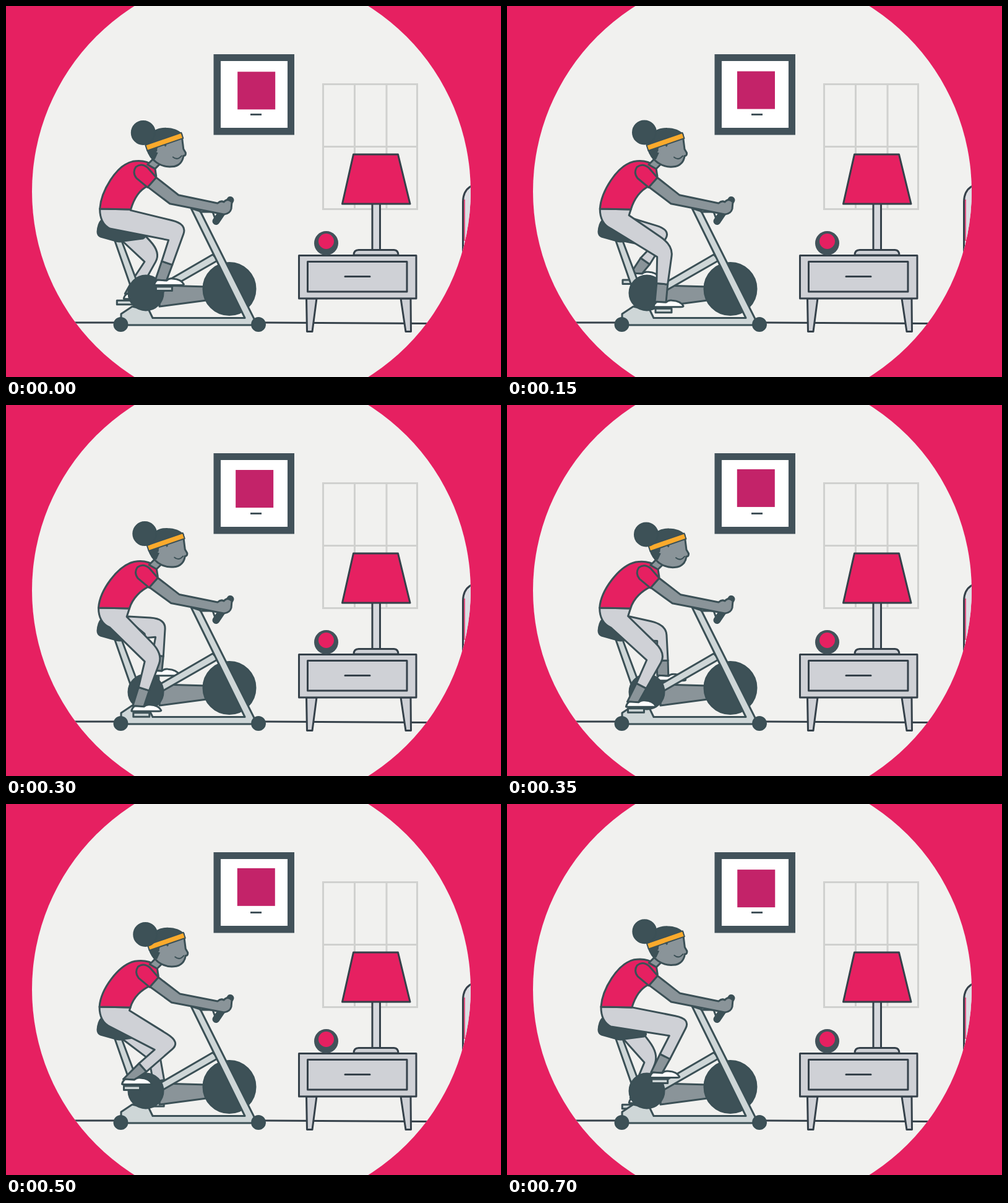
Write an HTML page that moves like this. It is 800 px wide and 600 px high and loops after 750 ms.

```html
<!DOCTYPE html>
<html lang="en">
<head>
<meta charset="utf-8">
<title>Exercise bike</title>
<style>
  html, body { margin: 0; width: 100%; height: 100%; overflow: hidden; background: #e62061; }
  svg { display: block; width: 100vw; height: 100vh; }
  .ink { stroke: #3b5056; stroke-width: 3; stroke-linejoin: round; stroke-linecap: round; }
  .room { stroke: #35414a; stroke-width: 3; stroke-linejoin: round; stroke-linecap: round; }
  .fine { stroke-width: 2; }
  .grip { stroke-width: 12; }
  .dark { fill: #3d5157; }
  .cloth { fill: #cfd1d6; }
  .metal { fill: #ced6d7; }
  .skin { fill: #8a9499; }
  .pink { fill: #e62061; }
  .white { fill: #fff; }
  .none { fill: none; }
</style>
</head>
<body>
<svg viewBox="0 0 800 600">
  <defs><clipPath id="hole"><circle cx="396.5" cy="300" r="354.5"/></clipPath></defs>
  <rect width="800" height="600" class="pink"/>
  <g clip-path="url(#hole)">
    <rect width="800" height="600" fill="#f1f1ef"/>

    <!-- wall -->
    <path d="M512.5 126.5H664.5V328.5H512.5ZM563.5 126.5V328.5M615 126.5V328.5M512.5 227.5H664.5" class="none" stroke="#d0d1cf" stroke-width="3"/>
    <rect x="335.5" y="78" width="130.5" height="130.5" fill="#42525a"/>
    <rect x="347" y="89" width="108" height="108" class="white"/>
    <rect id="badge" x="-30.5" y="-30.5" width="61" height="61" fill="#c32369"/>
    <path d="M395 175.5H413" stroke="#42525a" stroke-width="3"/>

    <!-- furniture -->
    <path d="M105 512H420L690 513.5" class="room none"/>
    <path d="M760 288Q738 294 738.5 318V400H760Z" class="room" fill="#dcdde2"/>
    <path d="M741 313V380" stroke="#e62061" stroke-width="1.5"/>
    <g class="room">
      <path d="M485.500 473H502L495 526.5H486.5ZM638 473H654L654.5 526.5H646Z" class="cloth"/>
      <rect x="592" y="318" width="12.5" height="78" fill="#d6d8dd"/>
      <path d="M562 403Q562 394.5 570 394.5H627Q634 395 634 403Z" class="cloth"/>
      <rect x="473.5" y="403.5" width="189.5" height="69.5" class="cloth"/>
      <rect x="487.5" y="413.5" width="160.5" height="48.5" class="cloth"/>
      <path d="M548 437.5H588"/>
      <path d="M561.5 240H633.5L653 320H543.5Z" class="pink"/>
    </g>
    <circle cx="517.5" cy="383.5" r="19.5" fill="#42525a"/>
    <circle cx="517.5" cy="380.5" r="12.5" class="pink"/>

    <!-- bike and rider -->
    <g class="ink">
      <g id="farLeg"></g>
      <path d="M250 452L324 454V476L248 486Z" class="skin"/>
      <path d="M176 380H187L214 452L201 452Z" class="metal"/>
      <path d="M154 347Q149 352 148 365Q148 371 153 373L178 380Q184 382 190 380L221 376Q226 374 224 370L200 350Z" class="dark"/>
      <circle cx="361" cy="457.5" r="42" class="dark"/>
      <path d="M248 452L334 402L343 411L254 462Z" class="metal"/>
      <path d="M186 516V498L204 486L231 492L237 504.5H386L299 327L314 332L406 516Z" class="metal"/>
      <circle cx="226" cy="464" r="28" class="dark"/>
      <circle cx="185.5" cy="515" r="10.5" class="dark"/>
      <circle cx="408" cy="515" r="10.5" class="dark"/>
      <path d="M314 333H334L338 344" class="none"/>
      <path d="M339.5 348L362.5 314" class="grip"/>
      <g id="nearLeg"></g>
      <path id="torso" class="pink"/>
      <path id="arm" class="skin"/>
      <g id="head">
        <path d="M229 257L240 246L250 255L241 264Z" class="skin"/>
        <path d="M229 232C233 250 250 262 268 260.5C281 260 286 251 287 243Q291 243 290.5 238L287 232L284 208L229 226Z" class="skin"/>
        <path d="M229 219C232 205 246 198.5 259 199C270 199 279 203 283 208L228 226ZM229 234Q233 244 240 247L245 236L258 226L256 223Z" class="dark"/>
        <path d="M243 237C243 224 252 220 257 227L258 232L246 238Z" class="skin" stroke="none"/>
        <path d="M243.5 235C243 225 252 220 257 226M270 245Q277 251 284 243" class="none fine"/>
        <path d="M225.5 225.5L283.500 205.5L286.5 214.5L228.5 234.5Z" fill="#fbaa2c" class="fine"/>
      </g>
      <circle id="bun" cx="222" cy="206" r="18.5" class="dark"/>
      <path id="sleeve" class="pink"/>
    </g>
  </g>
</svg>
<script>
const LOOP = 750, STEP = 50, TURN = 2 * Math.PI;

// each leg: joint lengths, half width, and the circle its pedal follows
const near = { hip: [195, 330], thigh: 90, shin: 83, cuff: 53, half: 14.5,
  crank: [230, 473], radius: 30, phase: -0.56, foot: 0 };
const far = { hip: [178, 365], thigh: 72, shin: 70, cuff: 45, half: 11,
  crank: [219, 468], radius: 29, phase: 2.74, foot: 14 };

const $ = id => document.getElementById(id);
const set = (id, d) => $(id).setAttribute('d', d);
const move = (id, x, y) => $(id).setAttribute('transform', `translate(${x} ${y})`);
const shape = (d, cls) => `<path d="${d}" class="${cls}"/>`;

const add = (p, q, k = 1) => [p[0] + q[0] * k, p[1] + q[1] * k];
const polar = (angle, r = 1) => [r * Math.cos(angle), r * Math.sin(angle)];
const angleTo = (p, q) => Math.atan2(q[1] - p[1], q[0] - p[0]);
const wave = (t, peak) => Math.cos(TURN * (t - peak) / LOOP);

function random(seed) {
  const v = Math.sin(seed * 12.9898) * 43758.5453;
  return v - Math.floor(v);
}

// knee of a two-bone leg, bent forward
function bend(hip, ankle, a, b) {
  const d = Math.min(Math.hypot(ankle[0] - hip[0], ankle[1] - hip[1]), a + b);
  const open = Math.acos((d * d + a * a - b * b) / (2 * d * a));
  return add(hip, polar(angleTo(hip, ankle) - open, a));
}

function leg(o, t, crease, start, end) {
  const pedal = add(o.crank, polar(o.phase + TURN * t / LOOP, o.radius));
  const shoe = add(pedal, [o.foot, 0]);
  const ankle = add(shoe, [-5, -13]);
  const knee = bend(o.hip, ankle, o.thigh, o.shin);
  const up = angleTo(o.hip, knee), down = angleTo(knee, ankle);

  // mitred knee corners, then the trouser hem
  const tilt = (up + down) / 2 - TURN / 4 - 0.3;
  const corner = polar(tilt, o.half / Math.cos((down - up) / 2));
  const cap = add(knee, corner), pit = add(knee, corner, -1);
  const hem = add(knee, polar(down, o.cuff)), side = polar(down - TURN / 4, 9);
  const front = add(hem, side), back = add(hem, side, -1);
  const top = add(cap, polar(angleTo(cap, crease), 25));
  const low = add(cap, polar(angleTo(cap, front), 17));

  const skin = shape(`M${back}L${front}L${add(shoe, [4, -13])}L${add(shoe, [-14, -14])}Z`, 'skin');
  const block = `<rect x="${pedal[0] - 13}" y="${pedal[1] - 3}" width="26" height="6.5" class="metal"/>`;
  const sole = `<g transform="translate(${shoe})">` +
    shape('M-16-6Q-15-11-11-14L4-13Q8-17 14-16Q28-15 32-7Q32-5.500 28-5.500H-15Z', 'white') + '</g>';
  const cloth = shape(`M${start}L${crease}L${top}Q${cap} ${low}L${front}L${back}L${pit}${end}Z`, 'cloth');
  return skin + block + sole + cloth;
}

function draw(t) {
  const sway = wave(t, 440), dip = wave(t, 285);
  const hx = 1.5 + 2 * sway, hy = 0.8 + 1.7 * sway;
  const wx = -1.25 - 1.25 * dip;
  const X = v => v + hx, Y = v => v + hy, W = v => v + wx;

  $('farLeg').innerHTML = leg(far, t, [198, 342], '178 350', 'L188 380');
  $('nearLeg').innerHTML = leg(near, t, [198.7 - 3.6 * dip, 335.5 + 7 * dip],
    `${W(152)} 328L${W(202)} 329`, `L168 360Q${W(152)} 352 ${W(152)} 328`);

  set('torso', `M${W(152)} 328C${W(154)} 300 ${X(178)} ${Y(258)} ${X(205)} ${Y(252)}` +
    `C${X(222)} ${Y(249)} ${X(236)} ${Y(254)} ${X(241)} ${Y(263)}L${X(243)} ${Y(276)}` +
    `L${X(229)} ${Y(292)}C${X(216)} ${Y(298)} ${W(207)} 312 ${W(202)} 329Z`);
  set('sleeve', `M${X(229)} ${Y(294)}L${X(211)} ${Y(279)}Q${X(204)} ${Y(270)} ${X(210)} ${Y(261)}` +
    `Q${X(219)} ${Y(254)} ${X(229)} ${Y(262)}L${X(243)} ${Y(278)}Z`);
  set('arm', `M${X(243)} ${Y(278)}L${279 + hx * .6} ${306 + hy * .4}L342 319Q347 314 352 317` +
    `Q358 310 365 317L364 328Q362 336 352 337L${265 + hx * .8} ${320 + hy * .4}L${X(229)} ${Y(293)}Z`);
  move('head', hx, hy);
  move('bun', hx, hy + 0.7 + 1.9 * wave(t, 490));

  const seed = t / STEP + 1;
  move('badge', 401 + 4 * random(seed), 134 + 3 * random(seed + 40));
}

const begin = performance.now();
function tick() {
  const t = (performance.now() - begin) % LOOP;
  draw(Math.floor(t / STEP) * STEP);
  requestAnimationFrame(tick);
}
tick();
</script>
</body>
</html>
```
